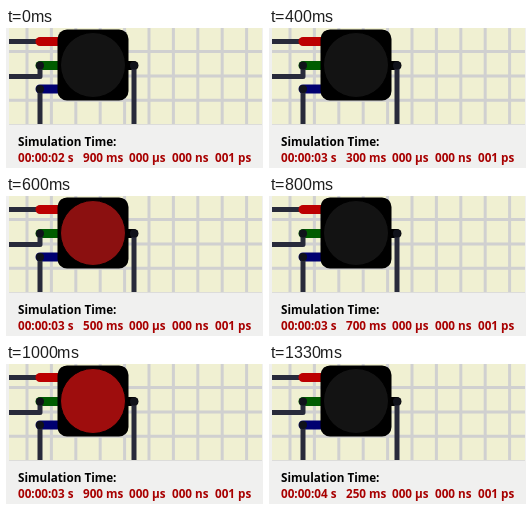
An HTML page for the animation above (1.4 s loop, 257x140 px).

```html
<!DOCTYPE html>
<html lang="en">
<head>
<meta charset="utf-8">
<title>Simulation</title>
<style>
  html, body { margin: 0; width: 100%; height: 100%; overflow: hidden; background: #f0f0ef; }
  svg { display: block; width: 100%; height: 100%; }
  text { font: bold 11.7px "Open Sans", "Noto Sans", sans-serif; white-space: pre; }
  .grid { stroke: #d0d0d0; stroke-width: 3; }
  .wire { fill: none; stroke: #282a3a; stroke-width: 5; stroke-linejoin: round; }
  .pin { stroke-width: 9; stroke-linecap: round; }
</style>
</head>
<body>
<svg viewBox="0 0 257 140">
  <clipPath id="view"><rect x="3" width="253" height="96"/></clipPath>
  <g clip-path="url(#view)">
    <rect width="257" height="96" fill="#f0f0d2"/>
    <g id="grid" class="grid"></g>
    <path class="pin" d="M34 37.5H54" stroke="#005c00"/>
    <path class="pin" d="M34 61H54" stroke="#000070"/>
    <path class="pin" d="M121 37.5H128" stroke="#000"/>
    <path class="wire" d="M3 13.5H34M3 48.5H34V37.5M34 61V97M128 37.5V97"/>
    <path class="pin" d="M34 13.5H54" stroke="#bc0000"/>
    <g fill="#10121a">
      <circle cx="34" cy="37.5" r="4"/>
      <circle cx="34" cy="61" r="4"/>
      <circle cx="128" cy="37.5" r="4"/>
    </g>
    <rect x="51.5" y="1.5" width="71" height="71" rx="9.5"/>
    <circle id="led" cx="87" cy="37" r="32.5" stroke="#000"/>
  </g>
  <path d="M3 96.5H256" stroke="#dcdcda"/>
  <text x="12" y="118">Simulation Time:</text>
  <g fill="#a80000">
    <text id="seconds" x="12" y="134"></text>
    <text id="millis" x="77" y="134"></text>
    <text x="123" y="134">000 µs</text>
    <text x="166" y="134">000 ns</text>
    <text x="209" y="134">001 ps</text>
  </g>
</svg>
<script>
const LOOP = 1400, STEP = 200 / 3;
const FLASHES = ['#871010', '#8b1010', '#9e0d0d'];
const byId = id => document.getElementById(id);
const led = byId('led'), seconds = byId('seconds'), millis = byId('millis');

let lines = '';
for (let x = 21; x < 257; x += 24.4) lines += `M${x} 0V96`;
for (let y = 23.5; y < 96; y += 24.4) lines += `M3 ${y}H256`;
byId('grid').innerHTML = `<path d="${lines}"/>`;

function draw(now) {
  const t = Math.floor(now % LOOP / 10) * 10;
  const tick = Math.floor((t * 3 + 10) / 200);

  // The simulator clock advances in whole 50 ms steps.
  const clock = Math.ceil((2900 + tick * STEP) / 50 - 0.001) * 50;
  seconds.textContent = `00:00:0${Math.floor(clock / 1000)} s`;
  millis.textContent = `${String(clock % 1000).padStart(3, '0')} ms`;

  // Three flashes, 200 ms on and 200 ms off, then a pause.
  const phase = tick - 1;
  const lit = phase >= 0 && phase % 6 < 3;
  led.setAttribute('fill', lit && FLASHES[Math.floor(phase / 6)] || '#131313');
}

const start = performance.now();
function loop() {
  draw(performance.now() - start);
  requestAnimationFrame(loop);
}
loop();
</script>
</body>
</html>
```
